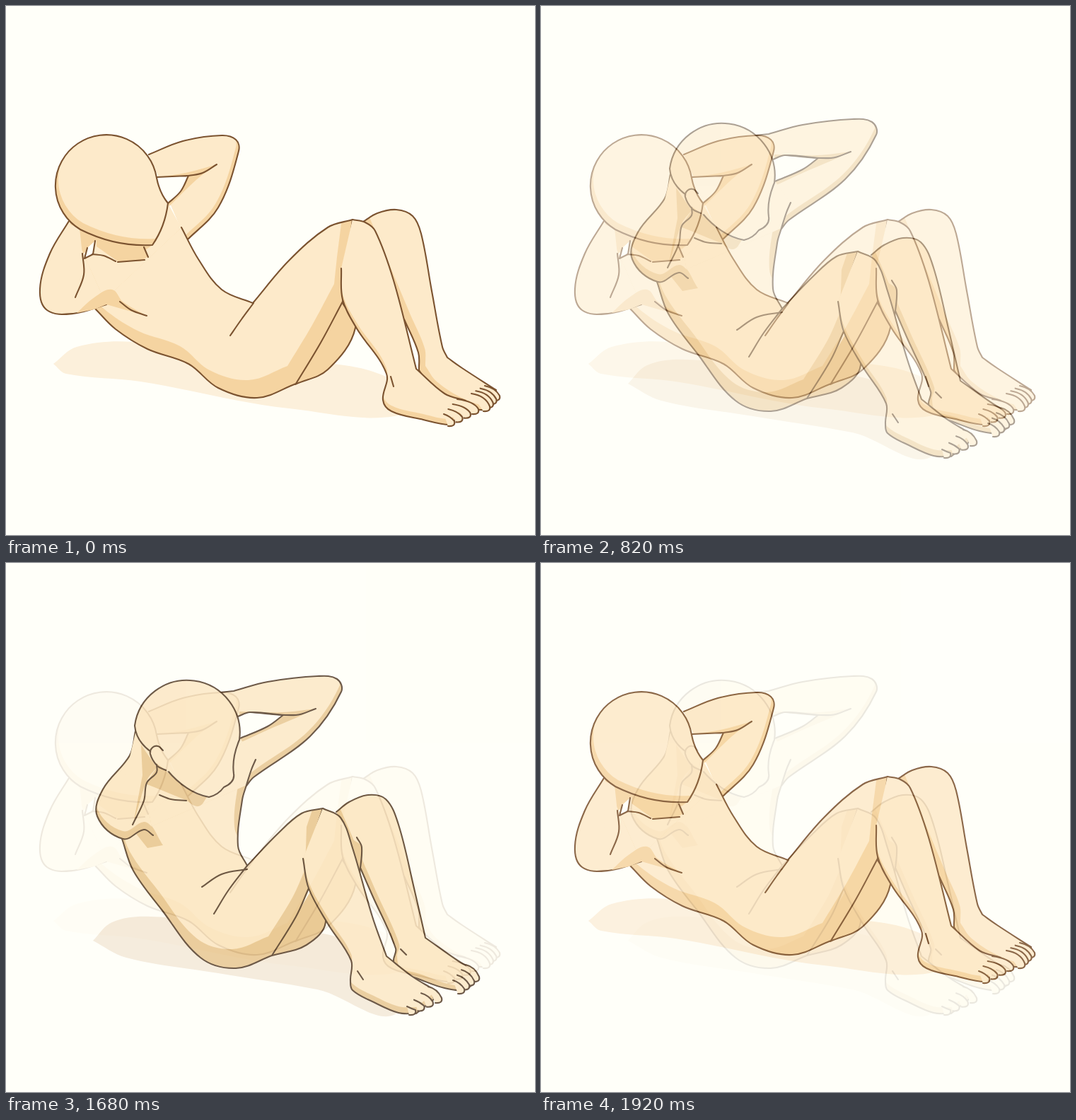
Recreate the animation shown at these times as an HTML page. Size 748 px wide and 748 px high, loop 1.96 s.

```html
<!DOCTYPE html>
<html lang="en">
<head>
<meta charset="utf-8">
<title>Sit-up</title>
<style>
  html, body { margin: 0; width: 100%; height: 100%; overflow: hidden; background: #fffff9; }
  svg { display: block; width: 100%; height: 100%; }
  path { stroke-linecap: round; stroke-linejoin: round; }
  .line { fill: none; stroke: var(--ink); stroke-width: 2.1; }
  .skin { fill: var(--skin); }
  .shade { fill: var(--shade); }
  .ground { fill: var(--ground); }
  .hole, rect { fill: #fffff9; }
  #down { --skin: #fdeaca; --shade: #f5d4a1; --ground: #fcf0db; --ink: #7b5330; }
  #up { --skin: #fce8c6; --shade: #e9c994; --ground: #f4ead9; --ink: #59432f; animation: fade 1960ms infinite; }
  /* eight 40 ms steps in, seven 40 ms steps out */
  @keyframes fade {
    0% { opacity: 0; animation-timing-function: step-end; }
    35.7143% { opacity: 0; animation-timing-function: steps(8, jump-start); }
    52.0408% { opacity: 1; animation-timing-function: step-end; }
    85.7143% { opacity: 1; animation-timing-function: steps(7, jump-start); }
    100% { opacity: .125; }
  }
</style>
</head>
<body>
<svg viewBox="0 0 748 748">
  <g id="down"></g>
  <g id="up"></g>
</svg>
<script>
// Smooth curve through key points; "/" makes the point before it a corner. Plain path data passes through.
function smooth(text) {
  if (text[0] === 'M') return text;
  let d = '', last = null;
  for (const run of text.split('/')) {
    const pts = run.trim().split(/\s+/).map(p => p.split(',').map(Number));
    if (last) pts.unshift(last); else d = 'M' + pts[0];
    for (let i = 0; i < pts.length - 1; i++) {
      const p = pts[i], q = pts[i + 1];
      const reach = Math.hypot(q[0] - p[0], q[1] - p[1]) * .35;
      const handle = (at, from, to, sign) => {
        const k = sign * reach / (Math.hypot(to[0] - from[0], to[1] - from[1]) || 1);
        return at.map((v, n) => (v + (to[n] - from[n]) * k).toFixed(1));
      };
      d += `C${handle(p, pts[i - 1] || p, q, 1)} ${handle(q, p, pts[i + 2] || q, -1)} ${q}`;
    }
    last = pts.at(-1);
  }
  return d;
}

const draw = (kind, ...shapes) => shapes.map(s => `<path class="${kind}" d="${smooth(s)}"/>`).join('');

// A body part is lit by moving its skin over a shaded copy of itself.
let clips = 0;
function part(outline, dx = 0, dy = 0) {
  const id = 'clip' + clips++;
  return `<clipPath id="${id}">${draw('', outline)}</clipPath><g clip-path="url(#${id})">` + draw('shade', outline) +
    `<g transform="translate(${dx} ${dy})">${draw('skin', outline)}</g></g>` + draw('line', outline);
}

// Four toes spread evenly between two base points and two tips.
function toes(baseA, baseB, tipA, tipB) {
  const mix = (a, b, k) => a.map((v, n) => v + (b[n] - v) * k);
  return [0, 1, 2, 3].map(i => {
    const [x, y] = mix(baseA, baseB, i / 3), [u, v] = mix(tipA, tipB, i / 3);
    return draw('skin line', `M${x},${y} Q${u - 6},${y + 3} ${u},${v} q2,8 -9,7`);
  }).join('');
}

const scene = (id, ...layers) => {
  document.getElementById(id).innerHTML = '<rect width="748" height="748"/>' + layers.join('');
};

scene('down',
  draw('ground', '67,506 100,482 180,475 400,500 530,521 580,572 400,569 190,531 85,520 67,506'),
  // far leg and thigh
  part('505,305 525,293 552,288 575,297 587,322 602,403 617,482 624,497 / 645,512 693,543 / 690,558 / 677,571 640,562 600,537 584,515 / 583,490 563,443', 9, -6),
  toes([677, 537], [658, 548], [698, 551], [684, 566]),
  draw('shade line', '476,420 / 494,455 455,514 409,535'),
  // far arm
  part('202,210 250,191 305,183 325,189 329,205 300,285 255,332', -4, -5),
  draw('shade', '215,242 258,235 298,224 / 270,245 229,285'),
  draw('hole line', '213,242 235,241 258,240 / 247,262 229,279 / 216,262'),
  draw('line', '258,240 278,236 298,224'),
  // torso and near leg
  draw('skin', '126,428 / 108,357 / 128,324 / 207,338 / 229,279 / 247,312 / 256,336'),
  part('248,313 272,358 305,401 349,420 / 400,360 455,313 490,302 / 480,380 / 476,418 / 445,476 410,534 / 355,554 300,540 258,506 200,485 155,457 126,428', -12, -25),
  part('490,302 508,306 522,318 548,388 580,513 / 620,548 650,558 / 657,572 / 635,585 / 627,592 590,585 545,573 533,557 538,520 496,456 476,415 474,371', 0, -8),
  toes([638, 556], [619, 577], [668, 570], [634, 587]),
  draw('line', '317,466 333,443 350,420', '544,524 548,538'),
  // near arm
  draw('shade', '89,304 / 128,324 / 127,333 108,352 / 104,335'),
  part('89,304 62,350 48,400 58,430 95,435 142,422'),
  draw('skin', '88,308 / 104,314 / 111,380 / 90,380'),
  draw('shade', '100,434 125,412 150,401 165,418 197,437 / 170,430 142,422 / 125,429'),
  draw('hole line', '126,332 / 123,351 / 111,357 / 115,342'),
  // neck and head
  draw('shade', '128,324 / 207,338 / 197,345 / 200,355 / 190,361 / 158,361 / 128,340'),
  draw('line', '108,350 110,380 98,412', '122,351 138,353 155,361', '158,362 196,359', '195,341 201,355', '161,418 177,430 199,438'),
  part('M229,279 Q225,312 207,338 Q155,341 105,316 A72,72 0 1 1 213,243 Q217,264 229,279', 4, -9)
);

scene('up',
  draw('ground', '123,534 150,508 205,500 400,518 490,540 560,630 440,603 300,580 170,558 123,534'),
  // far leg and thigh
  part('467,352 485,338 512,328 537,334 555,370 577,460 593,530 / 640,563 660,574 / 664,590 / 650,603 620,601 580,587 553,578 548,562 551,545 518,470 501,431', 5, -6),
  toes([650, 568], [632, 590], [669, 585], [648, 602]),
  draw('shade', '489,390 503,402 500,440 / 488,410'),
  draw('line', '496,388 503,402 500,440', '558,546 566,554'),
  draw('shade line', '432,462 / 452,507 425,540 376,555'),
  // far arm
  part('303,183 322,181 / 370,168 440,160 468,164 474,182 430,245 350,303 340,315', -3, -7),
  draw('shade', '330,210 390,211 438,206 / 410,219 370,236 331,254'),
  draw('hole line', '328,217 345,211 392,215 / 370,231 331,248'),
  draw('line', '345,211 410,215 438,206'),
  // torso and near leg
  draw('skin', '164,390 / 205,270 / 326,265 / 331,248 / 353,278 / 340,315'),
  part('340,314 334,335 328,400 341,428 / 385,382 418,354 448,347 / 430,400 / 428,460 / 410,500 376,555 / 325,573 275,558 220,490 180,435 164,390', -5, -27),
  part('448,347 473,360 490,403 518,500 538,556 / 575,585 603,602 / 605,617 / 580,637 / 555,636 520,621 490,604 487,590 488,562 455,510 428,460 420,418', 0, -9),
  toes([597, 599], [567, 627], [616, 615], [579, 632]),
  draw('line', '294,496 315,462 341,428', '497,577 505,589', '277,458 305,440 341,433', '353,278 347,292 340,314'),
  // neck and near arm
  draw('shade', '203,268 / 228,296 / 285,330 / 272,344 254,335 / 197,312', '177,374 197,364 222,399 / 200,403'),
  draw('line', '217,328 233,334 255,336'),
  part('183,238 175,272 137,320 129,358 165,390 195,377 208,385', 0, -11),
  draw('skin', '183,240 / 206,268 / 213,290 / 199,310 / 184,363 / 160,340'),
  draw('shade', '191,257 / 213,289 / 199,308 180,369 / 193,300'),
  draw('line', '213,285 213,296 199,311 195,336 179,370'),
  // head and ear
  part('M228,293 Q255,325 287,331 Q300,328 308,317 Q324,310 322,298 Q319,276 330,250 A74.5,74 0 1 0 182,230 Q184,252 205,267'),
  draw('skin', '222,265 207,261 208,280 / 229,295 / 245,280'),
  draw('line', '222,265 215,259 207,261 204,270 214,287 226,293')
);
</script>
</body>
</html>
```
